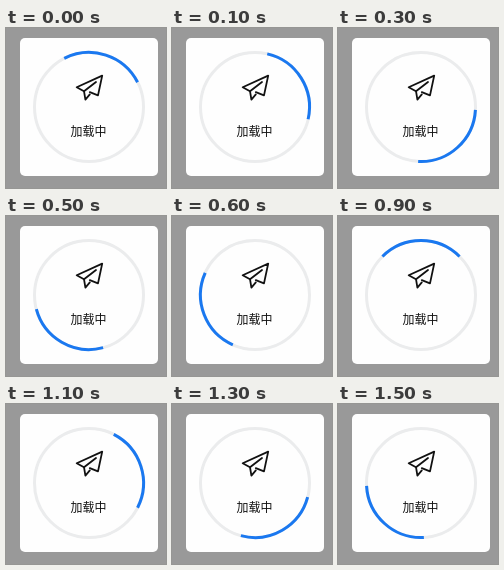
Recreate the animation shown at these times as an HTML page. Size 160 px wide and 160 px high, loop 1600 ms.

```html
<!DOCTYPE html>
<html lang="zh-CN">
<head>
<meta charset="utf-8">
<title>加载中</title>
<style>
html, body { margin: 0; width: 100%; height: 100%; overflow: hidden; background: #999; }
svg { display: block; width: 100vw; height: 100vh; }
text { font: 12px "Noto Sans CJK SC", "Noto Sans CJK", sans-serif; text-anchor: middle; }
</style>
</head>
<body>
<svg viewBox="0 0 160 160">
  <rect width="160" height="160" fill="#999"/>
  <rect x="14" y="10" width="138" height="138" rx="5" fill="#fefefe"/>
  <g fill="none" stroke-width="3">
    <circle cx="83" cy="79" r="54.5" stroke="#ebeced"/>
    <path id="arc" stroke="#1a78f0"/>
  </g>
  <g fill="none" stroke="#111" stroke-width="1.8" stroke-linejoin="round" stroke-linecap="round">
    <path d="M78 63.2 L70.7 59.2 L96.2 47.6 L92 67.4 L83.8 64.2"/>
    <path d="M90 54 L78 63.2 L79.4 71.6 L83.8 66.4"/>
  </g>
  <text x="82.5" y="108" fill="#111">加载中</text>
</svg>
<script>
const LOOP = 1600, STEP = 100;
const CX = 83, CY = 79, R = 54.5;
// [time in ms, rotation in degrees]
const turns = [[0, 18], [300, 138], [500, 210], [700, 288], [1100, 432], [1300, 510], [1500, 582]];
const arc = document.getElementById('arc');

function point(deg) {
  const a = deg * Math.PI / 180;
  return `${(CX + R * Math.sin(a)).toFixed(3)} ${(CY - R * Math.cos(a)).toFixed(3)}`;
}

function angleAt(t) {
  let i = 0;
  while (i < turns.length - 2 && t >= turns[i + 1][0]) i++;
  const [t0, a0] = turns[i], [t1, a1] = turns[i + 1];
  return a0 + (a1 - a0) * (t - t0) / (t1 - t0);
}

function draw(ms) {
  const t = Math.floor((ms % LOOP) / STEP) * STEP;
  const a = angleAt(t);
  arc.setAttribute('d', `M${point(a - 45)} A${R} ${R} 0 0 1 ${point(a + 45)}`);
}

const start = performance.now();
function tick() {
  draw(performance.now() - start);
  requestAnimationFrame(tick);
}
draw(0);
requestAnimationFrame(tick);
</script>
</body>
</html>
```
